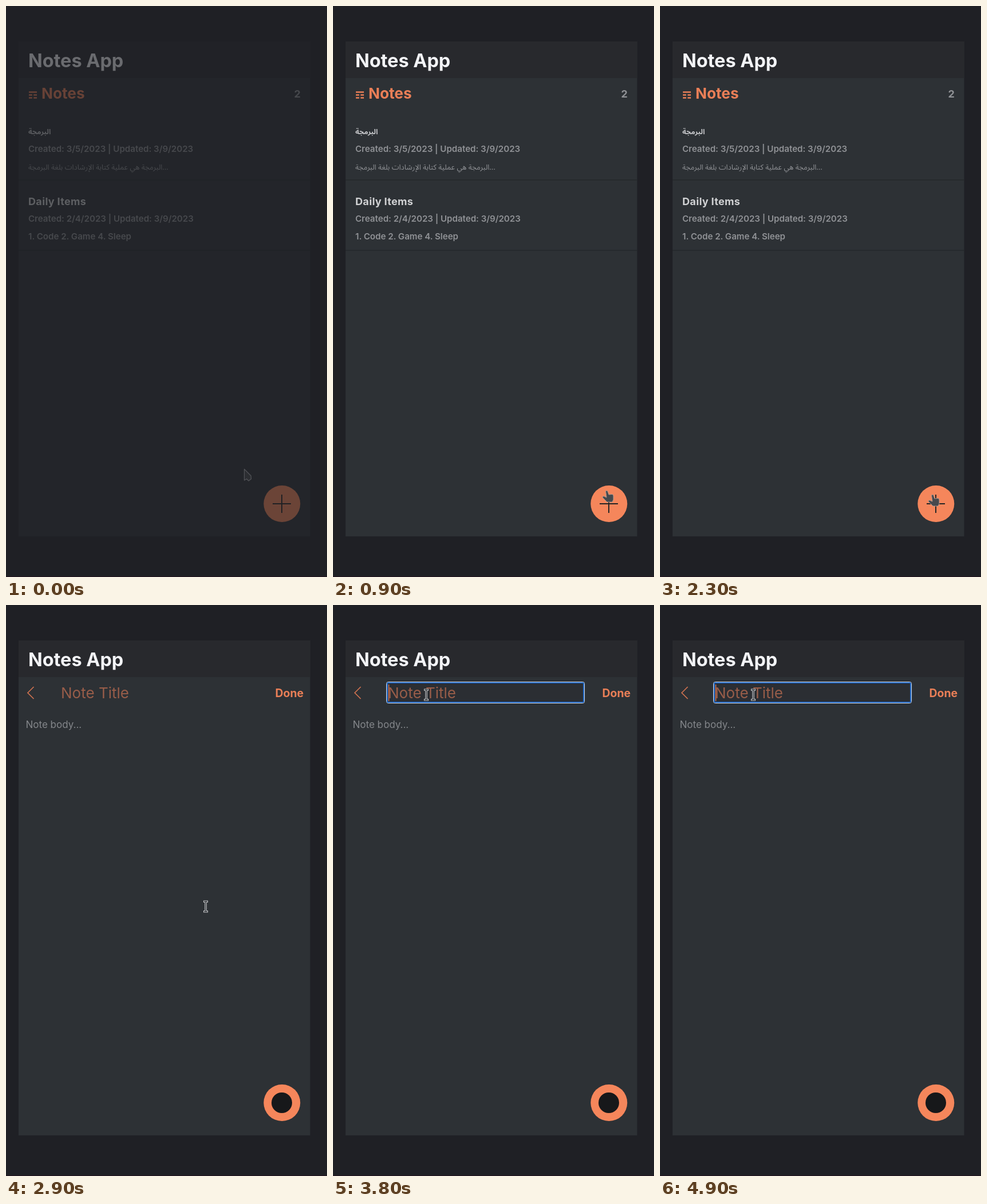
An HTML page that plays this animation: 561 px wide and 998 px high, repeating every 5000 ms.

```html
<!DOCTYPE html>
<html lang="en">
<head>
<meta charset="utf-8">
<title>Notes App</title>
<style>
  html, body { margin: 0; width: 100%; height: 100%; overflow: hidden; background: #1f2025; }
  svg { display: block; width: 561px; height: 998px; }

  text { font-family: Inter, "Open Sans", sans-serif; font-weight: 600; fill: #909296; font-size: 15.1px; }
  .brand { font-size: 32.4px; font-weight: 700; fill: #f3f4f7; }
  .head { font-size: 26.2px; font-weight: 700; fill: #ea7f57; }
  .count { font-size: 18px; font-weight: 700; }
  .name { font-size: 18px; font-weight: 700; letter-spacing: .35px; fill: #d0d1d3; }
  .arabic { font-family: "Noto Sans Arabic", "DejaVu Sans", sans-serif; font-size: 12.9px; font-weight: 400; }
  .arabic.name { font-size: 12.5px; font-weight: 700; letter-spacing: 0; fill: #c4c5c8; }
  .title { font-size: 26px; font-weight: 400; fill: #985d49; }
  .done { font-size: 19.4px; font-weight: 700; fill: #ea7f57; }
  .hint { font-size: 17px; font-weight: 400; fill: #84878b; }

  #stage { animation: fade 5s infinite; }
  #list, #editor, #focus, #caret, #pointer, #hand, #beam { animation: 5s step-end infinite; }
  #list { animation-name: list; }
  #editor { animation-name: editor; }
  #focus { animation-name: focus; }
  #caret { animation-name: caret; }
  #pointer { animation-name: pointer; }
  #hand { animation-name: hand; }
  #beam { animation-name: beam; }
  #cursor { animation: move 5s infinite; }

  @keyframes fade {
    0% { opacity: .36; animation-timing-function: steps(4); }
    8%, 100% { opacity: 1; }
  }
  @keyframes list { 0% { opacity: 1; } 50%, 100% { opacity: 0; } }
  @keyframes editor { 0% { opacity: 0; } 50%, 100% { opacity: 1; } }
  @keyframes focus { 0% { opacity: 0; } 76%, 100% { opacity: 1; } }
  @keyframes caret { 0%, 86% { opacity: 0; } 76%, 96%, 100% { opacity: 1; } }
  @keyframes pointer { 0%, 70% { opacity: 1; } 14%, 72%, 100% { opacity: 0; } }
  @keyframes hand { 0%, 54%, 100% { opacity: 0; } 14% { opacity: 1; } }
  @keyframes beam { 0%, 70% { opacity: 0; } 54%, 72%, 100% { opacity: 1; } }
  @keyframes move {
    0% { transform: translate(416px, 809px); animation-timing-function: steps(8); }
    16% { transform: translate(479px, 847px); }
    44% { transform: translate(479px, 847px); animation-timing-function: steps(1); }
    46% { transform: translate(477px, 854px); }
    52% { transform: translate(477px, 854px); animation-timing-function: steps(3); }
    58% { transform: translate(349px, 527px); animation-timing-function: steps(6); }
    70% { transform: translate(162px, 167px); animation-timing-function: steps(2); }
    74%, 100% { transform: translate(163px, 157px); }
  }
</style>
</head>
<body>
<svg viewBox="0 0 561 998">
  <rect y="997" width="561" height="1" fill="#25131f"/>
  <g id="stage">
    <rect x="22" y="62" width="509.5" height="865" fill="#2d3135"/>
    <rect x="22" y="62" width="509.5" height="64" fill="#28292d"/>
    <text class="brand" x="39" y="107">Notes App</text>
    <circle cx="482.3" cy="870" r="32" fill="#f5865b"/>

    <g id="list">
      <path d="M40 150.5h14M40 155.5h5.8m2.4 0h5.8M40 160.5h5.8m2.4 0h5.8" stroke="#ea7f57" stroke-width="2.6"/>
      <text class="head" x="62" y="162">Notes</text>
      <text class="count" x="503.5" y="159.5">2</text>

      <text class="arabic name" x="39" y="224">البرمجة</text>
      <text x="39" y="255">Created: 3/5/2023 | Updated: 3/9/2023</text>
      <text class="arabic" x="39" y="286">البرمجة هي عملية كتابة الإرشادات بلغة البرمجة...</text>

      <text class="name" x="39" y="347.5">Daily Items</text>
      <text x="39" y="377">Created: 2/4/2023 | Updated: 3/9/2023</text>
      <text x="39" y="408">1. Code 2. Game 4. Sleep</text>

      <path d="M22 304h509M22 427h509" stroke="#25282b" stroke-width="1.5"/>
      <path d="M466 870h32M482 854v32" stroke="#252525" stroke-width="2"/>
    </g>

    <g id="editor">
      <path d="M48.5 143L38 153.5L48.5 164" fill="none" stroke="#d07350" stroke-width="1.7"/>
      <g id="focus" fill="none">
        <rect x="93.5" y="134.5" width="346" height="37" rx="3" fill="#2b2e33" stroke="#d5e0ee"/>
        <rect x="95" y="136" width="343" height="34" rx="1.5" stroke="#1f66c4" stroke-width="2"/>
        <path id="caret" d="M97.5 139v29" stroke="#c8714f" stroke-width="1.6"/>
      </g>
      <text class="title" x="96" y="162.5">Note Title</text>
      <text class="done" x="470.5" y="160.5">Done</text>
      <text class="hint" x="34.5" y="214.5">Note body...</text>
      <circle cx="482" cy="870" r="18" fill="#17181a"/>
    </g>

    <g id="cursor" stroke-linejoin="round">
      <path id="pointer" d="M.5 .5V20L4.5 17.5L8 21L12.5 17.5L12 12Z" fill="#46494d" stroke="#b0b2b5" stroke-width="1.2"/>
      <path id="hand" d="M-2.5 1Q-1 -1 1 1L3 7L9 6.5Q11 7 11 9V16L9 20H0L-8 12Q-8 9 -5 10L-1 12Z" fill="#46494d" stroke="#b3a096" stroke-width=".9"/>
      <g id="beam" fill="none">
        <path d="M-4 -8.8H4M-4 8.8H4M0 -9V9" stroke="#c3c5c7" stroke-width="3.6"/>
        <path d="M-3 -8.8H3M-3 8.8H3M0 -9V9" stroke="#303338" stroke-width="1.4"/>
      </g>
    </g>
  </g>
</svg>
</body>
</html>
```
